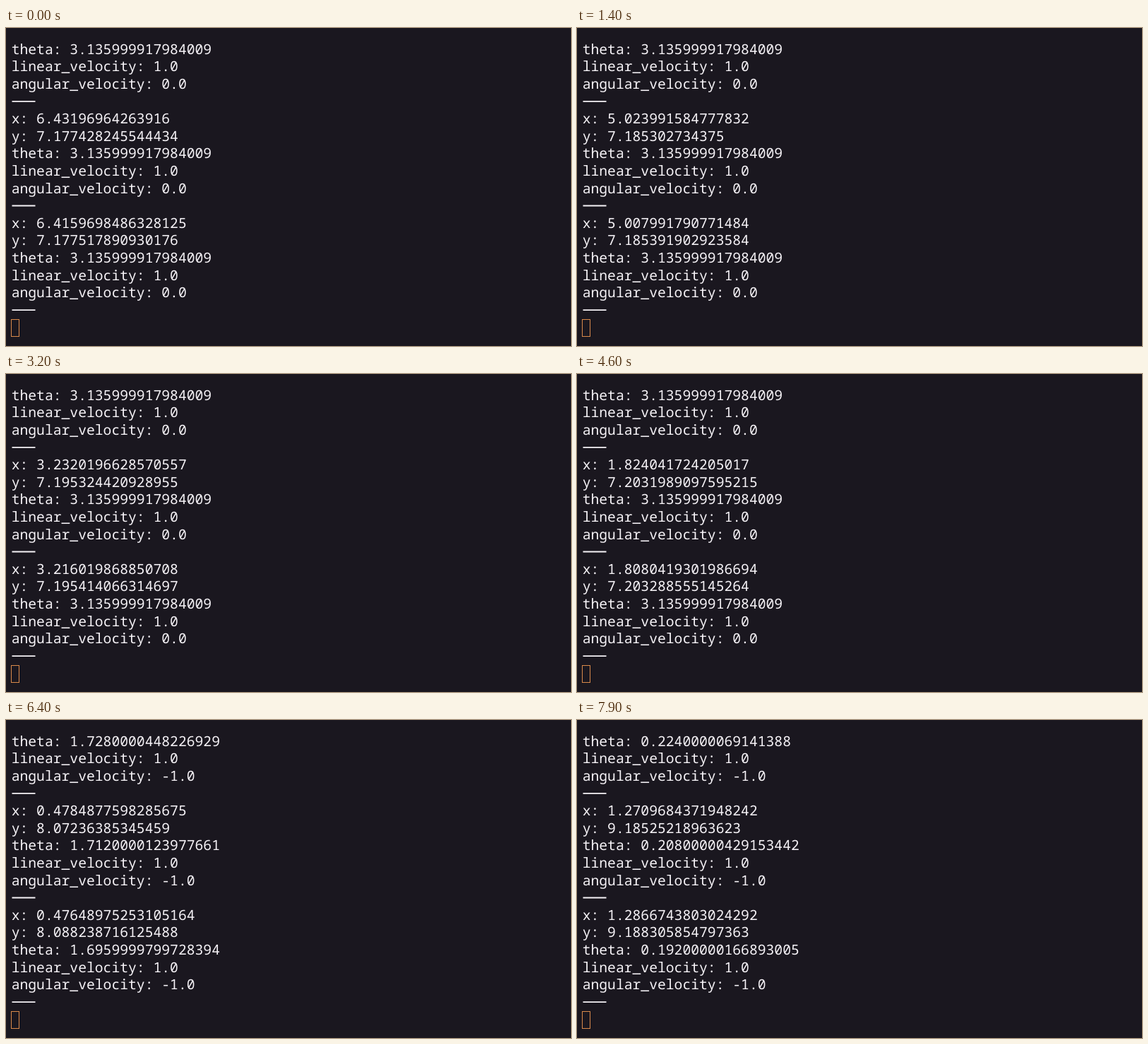
An HTML page for the animation above (8 s loop, 800 by 450 pixels).

```html
<!DOCTYPE html>
<html lang="en">
<head>
<meta charset="utf-8">
<title>Pose echo</title>
<style>
  html, body { margin: 0; width: 100%; height: 100%; overflow: hidden; background: #1a171f; }
  svg { display: block; width: 800px; height: 450px; }
  text {
    font: 500 19.7px "Fira Code", "Fira Mono", "Noto Sans Mono", "DejaVu Sans Mono", monospace;
    text-rendering: geometricPrecision;
    fill: #f6f3f7;
    white-space: pre;
  }
  .rule { stroke: #f6f3f7; stroke-width: 1.8; }
  .cursor { fill: none; stroke: #d98a4b; stroke-width: 1; }
</style>
</head>
<body>
<svg id="stage" viewBox="0 0 800 450"></svg>
<script>
const LOOP = 8000, TICK = 100;
const DT = 0.016, HEADING = 3.136, TURN = 310;
const LEFT = 7.7, BASE = 36.7, LINE = 24.6;
const FIRST = -2, LAST = 502;
const NS = "http://www.w3.org/2000/svg";
const stage = document.getElementById("stage");

function add(tag, attrs) {
  const el = document.createElementNS(NS, tag);
  for (const key in attrs) el.setAttribute(key, attrs[key]);
  return stage.appendChild(el);
}

// Straight run, then a steady clockwise turn
const thetaAt = k => HEADING - DT * Math.max(0, k - TURN);

function simulate() {
  const path = new Map();
  let x = 0, y = 0;
  for (let k = FIRST; k <= LAST; k++) {
    x += Math.cos(thetaAt(k)) * DT;
    y += Math.sin(thetaAt(k)) * DT;
    path.set(k, { x, y });
  }
  // Shift the path through known positions
  const dx = 0.476489743 - path.get(400).x;
  const dy = 7.177517716 - path.get(0).y;
  for (const p of path.values()) {
    p.x += dx;
    p.y += dy;
  }
  return path;
}

const path = simulate();
const float = v => String(Math.fround(v));

function message(k) {
  const p = path.get(k);
  return [
    "x: " + float(p.x),
    "y: " + float(p.y),
    "theta: " + float(thetaAt(k)),
    "linear_velocity: 1.0",
    "angular_velocity: " + (k > TURN ? "-1.0" : "0.0"),
    ""
  ];
}

const rows = [];
for (let i = 0; i < 16; i++) {
  const y = BASE + i * LINE;
  rows.push(add("text", { x: LEFT, y }));
  if (i % 6 === 3) add("line", { class: "rule", x1: 8.5, x2: 41.5, y1: y - 6.6, y2: y - 6.6 });
}
add("rect", { class: "cursor", x: 7.5, y: 412.5, width: 11, height: 24 });

function draw(time) {
  const t = Math.floor((time % LOOP) / TICK) * TICK;
  const k = Math.floor(t / 16 + 0.6);
  const lines = [...message(k - 2).slice(2), ...message(k - 1), ...message(k)];
  rows.forEach((row, i) => {
    if (row.textContent !== lines[i]) row.textContent = lines[i];
  });
}

const start = performance.now();
function loop() {
  draw(performance.now() - start);
  requestAnimationFrame(loop);
}
loop();
</script>
</body>
</html>
```
